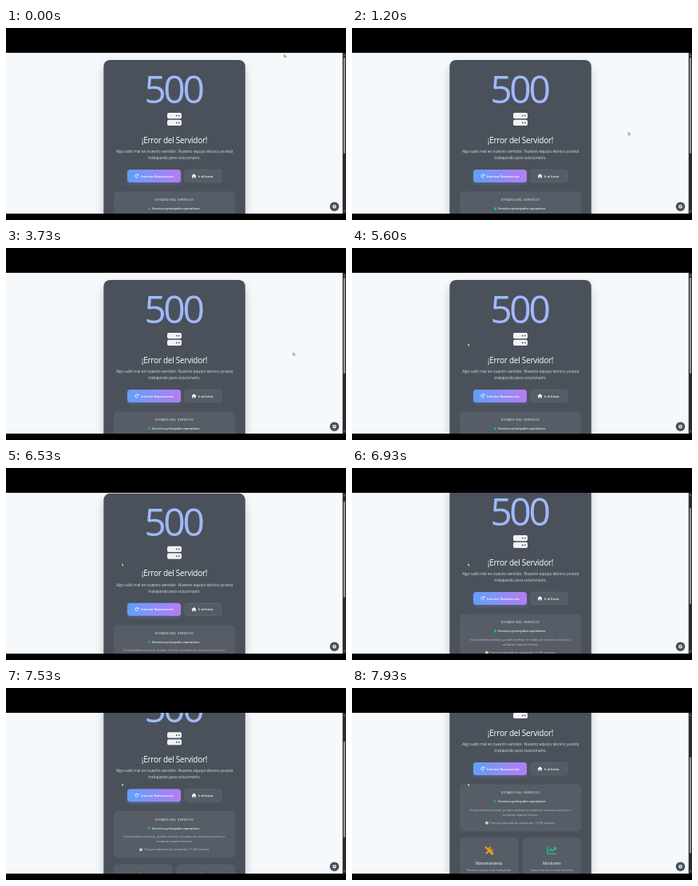
Write an HTML page that moves like this. It is 426x240 px and loops after 8000 ms.

```html
<!DOCTYPE html>
<html lang="es">
<head>
<meta charset="utf-8">
<title>Error del Servidor</title>
<style>
html, body { margin: 0; width: 100%; height: 100%; overflow: hidden; background: #000; }
svg { display: block; width: 100vw; height: 100vh; }
text { font-family: "Open Sans", "Noto Sans", sans-serif; fill: #fff; text-anchor: middle; }
.code { font-size: 48px; letter-spacing: -3.4px; text-anchor: start; fill: url(#ink); }
.title { font-size: 10px; letter-spacing: -.25px; }
.lead { font-size: 5px; letter-spacing: -.115px; fill: #d6d9de; }
.btn { font-size: 4px; font-weight: 600; letter-spacing: -.05px; text-anchor: start; }
.head { font-size: 4px; font-weight: 600; letter-spacing: .3px; fill: #d3d7dc; }
.status { font-size: 4px; font-weight: 600; letter-spacing: -.04px; text-anchor: start; fill: #eceef0; }
.note { font-size: 3.8px; letter-spacing: -.03px; fill: #c3c7cd; }
.name { font-size: 4.7px; font-weight: 500; }
.panel { fill: #565d67; stroke: #5d646e; stroke-width: .4; }
</style>
</head>
<body>
<svg viewBox="0 0 426 240">
  <defs>
    <linearGradient id="ink" x1="0" y1="0" x2="1" y2="1">
      <stop stop-color="#98bdf8"/><stop offset="1" stop-color="#a9b4fb"/>
    </linearGradient>
    <linearGradient id="primary">
      <stop stop-color="#60a0f8"/><stop offset="1" stop-color="#b67df3"/>
    </linearGradient>
    <filter id="blur" x="-30%" y="-30%" width="160%" height="160%"><feGaussianBlur stdDeviation="7"/></filter>
    <filter id="glow" x="-30%" y="-60%" width="160%" height="220%"><feGaussianBlur stdDeviation="2"/></filter>
    <clipPath id="view"><rect y="31" width="426" height="201"/></clipPath>
  </defs>
  <rect width="426" height="240"/>
  <g clip-path="url(#view)">
    <rect y="31" width="426" height="201" fill="#f6f9fb"/>
    <g id="page">
      <rect x="124" y="47" width="174" height="310" rx="8" opacity=".25" filter="url(#blur)"/>
      <rect x="122.3" y="40" width="177.5" height="310" rx="8" fill="#4a515b"/>
      <text class="code" x="173.3" y="93.5">500</text>

      <g fill="#f0f2f4">
        <rect x="202" y="106" width="18" height="7.2" rx="2"/>
        <rect x="202" y="114.8" width="18" height="7.2" rx="2"/>
      </g>
      <g fill="#4a515b">
        <circle cx="213.8" cy="109.6" r=".9"/><circle cx="216.9" cy="109.6" r=".9"/>
        <circle cx="213.8" cy="118.4" r=".9"/><circle cx="216.9" cy="118.4" r=".9"/>
      </g>

      <text class="title" x="211" y="143.5">¡Error del Servidor!</text>
      <text class="lead" x="211" y="155.8">Algo salió mal en nuestro servidor. Nuestro equipo técnico ya está</text>
      <text class="lead" x="211" y="163.8">trabajando para solucionarlo.</text>

      <rect x="152" y="179" width="67" height="16" rx="3.5" fill="#6f8ee8" opacity=".3" filter="url(#glow)"/>
      <rect x="152" y="177" width="67" height="16" rx="3.5" fill="url(#primary)"/>
      <path d="M165.4 183.6A2 2 0 1 0 165.5 186" fill="none" stroke="#fff" stroke-width=".8"/>
      <path d="M166.3 182.3v2.2h-2.2z" fill="#fff"/>
      <text class="btn" x="169" y="186.5">Intentar Nuevamente</text>
      <rect x="224" y="177.2" width="46" height="15.6" rx="3.5" fill="#555c66" stroke="#6a717b" stroke-width=".5"/>
      <path d="M235.5 182.2l3 2.7h-.8v2.6h-1.5v-1.7h-1.4v1.7h-1.5v-2.6h-.8z" fill="#fff"/>
      <text class="btn" x="241" y="186.5">Ir al Inicio</text>

      <rect class="panel" x="135.2" y="204.7" width="151.6" height="58.3" rx="5"/>
      <text class="head" x="211" y="216.3">ESTADO DEL SERVICIO</text>
      <circle id="dot" cx="179.5" cy="225.8" r="1.7" fill="#10c58a"/>
      <text class="status" x="183" y="227.3">Servicios principales operativos</text>
      <text class="note" x="211" y="237.6">Si el problema persiste, puedes verificar el estado de nuestros servicios o</text>
      <text class="note" x="211" y="243.5">contactar soporte técnico.</text>
      <circle cx="169" cy="252.7" r="1.9" fill="#e2e5e8"/>
      <path d="M169 251.4v1.4l.8.6" fill="none" stroke="#565d67" stroke-width=".5"/>
      <text class="note" x="213.7" y="254.1">Tiempo estimado de resolución: 15-30 minutos</text>

      <rect class="panel" x="135.2" y="271.3" width="73" height="60" rx="5"/>
      <rect class="panel" x="214" y="271.3" width="72.8" height="60" rx="5"/>
      <g fill="none" stroke="#f0a21b" stroke-width="2" stroke-linecap="round">
        <path d="M167.5 283l8 8M168.5 290.8l5.2-5.2" />
        <path d="M173.2 283.2a2.6 2.6 0 1 0 3.2 3.2" stroke-width="1.5"/>
        <path d="M173.6 289l2.3 2.3" stroke-width="2.8"/>
      </g>
      <g fill="none" stroke="#1fc48c" stroke-width="1.4" stroke-linecap="round" stroke-linejoin="round">
        <path d="M245 282.2v8.2q0 1 1 1h9.3"/>
        <path d="M247.5 288l2.3-2.4 2 1.8 3.4-3.8m-2 0h2v2"/>
      </g>
      <text class="name" x="171.6" y="304.9">Mantenimiento</text>
      <text class="name" x="250.4" y="304.9">Monitoreo</text>
      <text class="note" x="171.6" y="313.3">Nuestro equipo está trabajando</text>
      <text class="note" x="250.4" y="313.3">Supervisamos constantemente</text>
    </g>

    <circle cx="411.5" cy="223.2" r="5.8" fill="#4a515b"/>
    <circle cx="411.5" cy="223.2" r="1.6" fill="none" stroke="#fff" stroke-width="1.3"/>
    <rect x="421.7" y="31" width="4.3" height="201" fill="#292b2e"/>
    <path d="M422.8 35l1.1-1.5 1.1 1.5zM422.8 228.5l1.1 1.5 1.1-1.5z" fill="#a0a0a0"/>
    <rect id="thumb" x="422.9" y="37" width="2" height="120" rx="1" fill="#9b9da0"/>
    <path id="cursor" d="M0 0v3.6l.9-.8.7 1.4.7-.3-.6-1.4h1.2z" fill="#fff" stroke="#333" stroke-width=".4"/>
  </g>
</svg>
<script>
const $ = id => document.getElementById(id);

// Each key: time in ms, then values; moves ease in and out between keys.
const scrollKeys = [[0, 0], [6440, 0], [6660, 22], [7270, 22], [7820, 84]];
const cursorKeys = [
  [0, 348.5, 33], [1000, 348.5, 33], [1190, 346, 130], [2100, 346, 130],
  [2350, 361, 131], [2600, 359.5, 130.5], [4500, 359.5, 130.5],
  [4900, 118, 121], [5000, 118, 121], [5270, 145, 119]
];

function at(keys, t) {
  const n = keys.findIndex(k => k[0] > t);
  if (n < 0) return keys[keys.length - 1].slice(1);
  const [a, b] = [keys[n - 1], keys[n]];
  const u = (t - a[0]) / (b[0] - a[0]);
  const e = u * u * (3 - 2 * u);
  return a.slice(1).map((v, i) => v + (b[i + 1] - v) * e);
}

function draw(now) {
  const t = now % 8000;
  const [scroll] = at(scrollKeys, t);
  $('page').setAttribute('transform', `translate(0 ${-scroll})`);
  $('thumb').setAttribute('y', 37 + scroll * 0.59);
  $('cursor').setAttribute('transform', `translate(${at(cursorKeys, t)})`);
  // Status light pulses every two seconds.
  $('dot').setAttribute('opacity', 0.75 + 0.25 * Math.cos((t - 1200) / 1000 * Math.PI));
  requestAnimationFrame(draw);
}
requestAnimationFrame(draw);
</script>
</body>
</html>
```
